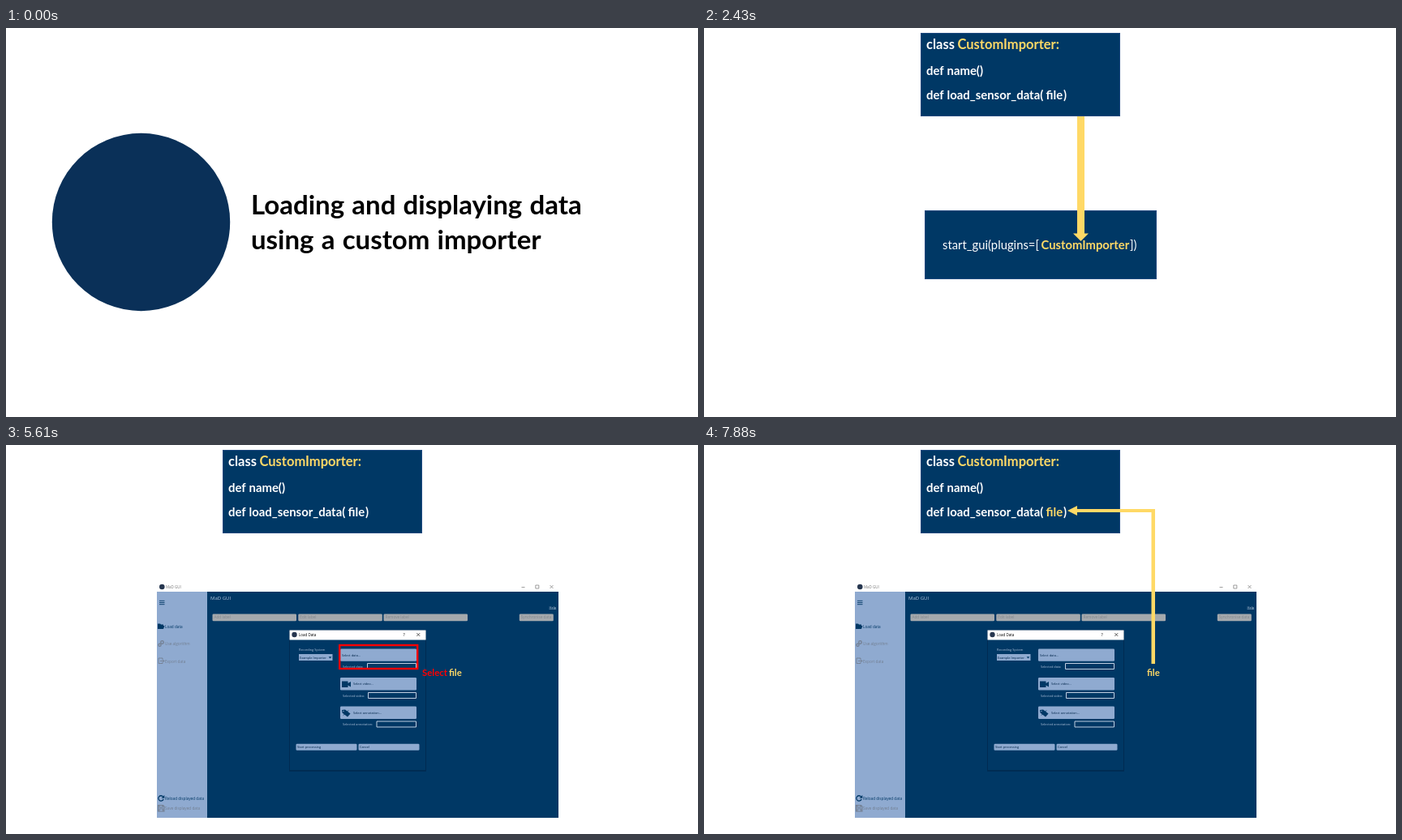
Recreate the animation shown at these times as an HTML page. Size 853x480 px, loop 8 s.

```html
<!DOCTYPE html>
<html lang="en">
<head>
<meta charset="utf-8">
<title>Custom importer</title>
<style>
html, body { margin: 0; width: 100%; height: 100%; overflow: hidden; background: #fff; }
svg { display: block; width: 100%; height: 100%; }
text { white-space: pre; }
.slide { font-family: Lato, Carlito, sans-serif; font-weight: 700; word-spacing: .035em; }
.ui { font-family: "Open Sans", "Noto Sans", sans-serif; }
.regular { font-weight: 400; }
.yellow { fill: #ffd966; }
.red { fill: #f00; }
.navy { fill: #003865; }
.pale { fill: #8faad0; }
.line { fill: none; stroke: #003865; }
.frame { fill: none; stroke: #f00; stroke-width: 2.4; }
</style>
</head>
<body>
<svg viewBox="0 0 853 480">
  <g data-show="0" class="slide" font-size="33">
    <circle cx="166.5" cy="239.5" r="109.7" fill="#0a3058"/>
    <text x="302" y="230">Loading and displaying data</text>
    <text x="302" y="273">using a custom importer</text>
  </g>

  <g data-show="1 2 3 4" class="slide" font-size="14.9" fill="#fff">
    <rect x="267.5" y="6.5" width="245" height="102" class="navy" stroke="#1f4a80"/>
    <text x="274" y="26" font-size="16.5">class <tspan x="312.5" class="yellow">CustomImporter:</tspan></text>
    <text x="274" y="58">def name()</text>
    <text x="274" y="88">def load_sensor_data(<tspan x="421.5" id="arg">file</tspan><tspan x="443">)</tspan></text>
  </g>

  <g data-show="1" class="slide" font-size="14.8" fill="#fff">
    <rect x="272.5" y="225.5" width="285" height="84" class="navy" stroke="#1f4a80"/>
    <path class="yellow" d="M460 109h9v144.500h5l-9.500 9.500-9.500-9.500h5z"/>
    <text x="294" y="273" class="regular">start_gui(plugins=[<tspan x="415.500" class="yellow" font-weight="700">CustomImporter</tspan><tspan x="525">])</tspan></text>
  </g>

  <g data-show="2 3 4" class="ui" font-size="4.7">
    <circle cx="192.300" cy="175" r="3.300" fill="#26364f"/>
    <text x="197" y="177" font-size="4.500" fill="#777">MaD GUI</text>
    <path d="M635.500 175.500h4M652.800 173h4v4h-4zM670.500 173l4 4m0-4l-4 4" fill="none" stroke="#777" stroke-width=".7"/>
    <rect x="186" y="181" width="495" height="279" class="navy"/>
    <rect x="186" y="181" width="62" height="279" class="pale"/>
    <text x="252" y="191" font-size="6" fill="#b4c5dc">MaD GUI</text>
    <text x="669.500" y="201.500" font-size="4" fill="#c5d1e2" text-decoration="underline">Help</text>
    <g id="toolbar"></g>

    <path class="line" stroke-width=".9" d="M189 192.300h6.500m-6.500 2.200h6.500m-6.500 2.200h6.500"/>
    <path class="navy" d="M187 220.500h3l1 1h3v1.500h1.500l-1.500 4h-7z"/>
    <g fill="none" stroke="#737f91">
      <circle cx="192.500" cy="243.500" r="1.800" stroke-width="1.300"/>
      <circle cx="189.500" cy="246.700" r="1.600" stroke-width="1.300"/>
      <path stroke-width=".9" d="M193 265v-2h-5v6.500h5v-1.500M190 266.500h5m-1.500-1.500l1.500 1.500-1.500 1.500"/>
      <path stroke-width="1.100" d="M187.500 444.500h6l1.500 1.500v6h-7.500zM189 444.500v2.500h4v-2.500M189 452v-3h4.500v3"/>
    </g>
    <path class="line" stroke-width="1.300" d="M193.600 434a3.200 3.200 0 1 0 .500 3"/>
    <path class="navy" d="M195.300 432v3.700h-3.700z"/>
    <g class="navy">
      <text x="196" y="226">Load data</text>
      <text x="196" y="437.700">Reload displayed data</text>
    </g>
    <g fill="#737f91">
      <text x="196" y="247">Use algorithm</text>
      <text x="196" y="268.500">Export data</text>
      <text x="196" y="450">Save displayed data</text>
    </g>

    <rect x="349" y="228" width="169" height="175" fill="#00264a" opacity=".55"/>
    <rect x="349.500" y="228.500" width="168" height="173" class="navy" stroke="#002a50" stroke-width=".8"/>
    <rect x="349.500" y="228.500" width="168" height="12" fill="#fff"/>
    <circle cx="355.500" cy="234" r="3.200" fill="#26364f"/>
    <text x="361" y="236" font-size="4.500">Load Data</text>
    <text x="489.500" y="236" font-size="5">?</text>
    <path d="M506.300 232l4 4m0-4l-4 4" stroke="#222" stroke-width=".7"/>
    <g font-size="3.900">
      <g fill="#aebfd8">
        <text x="361" y="253.700">Recording System</text>
        <text x="415" y="274.500">Selected data:</text>
        <text x="415" y="310.500">Selected video:</text>
        <text x="415" y="346">Selected annotation:</text>
      </g>
      <path fill="none" stroke="#c0cde0" d="M445.500 269.500h60v7h-60zM446.500 305.500h59v7h-59zM457 341h48.500v7H457z"/>
      <g id="buttons"></g>
    </g>
    <path class="navy" d="M397.700 261.300h3.600l-1.800 2.200zM414 291.500h7.500v2.500l3.500-2v6.500l-3.500-2v2.500H414z"/>
    <path class="navy" d="M414 327l4-.5 6.500 5-3.500 4-6.500-5z"/>
    <path d="M416 333.500l6-6" stroke="#003865"/>
    <circle cx="416" cy="328.500" r=".7" class="pale"/>
  </g>

  <g data-show="2" class="slide">
    <rect x="360.200" y="256.700" width="44" height="10.600" class="frame"/>
    <path class="yellow" d="M376 109h8v139.500h4l-8 8.500-8-8.500h4z"/>
    <text x="285" y="281" font-size="11.500" class="red regular">Select custom importer</text>
  </g>

  <g data-show="3" class="slide">
    <rect x="411.200" y="247" width="96" height="29" class="frame"/>
    <text x="513" y="285" font-size="11.400" class="red">Select</text>
  </g>

  <text data-show="3 4" x="546" y="285" font-size="11.400" class="slide yellow">file</text>

  <path data-show="4" class="yellow" d="M448 81l12-6v4h96v191h-4.500V83H460v4z"/>
</svg>

<script>
const cuts = [1070, 3340, 5610, 7880];
const period = 8000;
const byId = id => document.getElementById(id);

const button = ([x, y, w, h, label, indent = 2, r = 1.3]) =>
  `<rect x="${x}" y="${y}" width="${w}" height="${h}" rx="${r}"/>
   <text x="${x + indent}" y="${y + h / 2 + 1.5}">${label}</text>`;

function addButtons(id, fill, ink, list) {
  byId(id).innerHTML = `<style>#${id} rect{fill:${fill}}#${id} text{fill:${ink}}</style>` +
    list.map(button).join("");
}

addButtons("toolbar", "#a5a9ad", "#858a90", [
  [254.5, 208.5, 103.5, 8.7, "Add label"],
  [360.3, 208.5, 103.5, 8.7, "Edit label"],
  [465.5, 208.5, 103.5, 8.7, "Remove label"],
  [632.8, 208.5, 42, 8.7, "Synchronise data"],
]);
addButtons("buttons", "#8faad0", "#00264a", [
  [361, 258, 41.5, 8, "Example Importer", 1, 0],
  [412, 251.5, 94, 15.3, "Select data..."],
  [412, 287, 94, 15.5, "Select video...", 16],
  [412, 322.5, 94, 15.5, "Select annotation...", 16],
  [357.5, 368.8, 75, 8, "Start processing", 1.5],
  [434.5, 368.8, 75, 8, "Cancel", 1.5],
]);

const parts = [...document.querySelectorAll("[data-show]")];
const start = performance.now();

function draw() {
  const time = (performance.now() - start) % period;
  const scene = cuts.filter(cut => time >= cut).length;
  for (const part of parts) {
    part.style.display = part.dataset.show.includes(scene) ? "" : "none";
  }
  byId("arg").style.fill = scene === 4 ? "#ffd966" : "#fff";
  requestAnimationFrame(draw);
}
draw();
</script>
</body>
</html>
```
